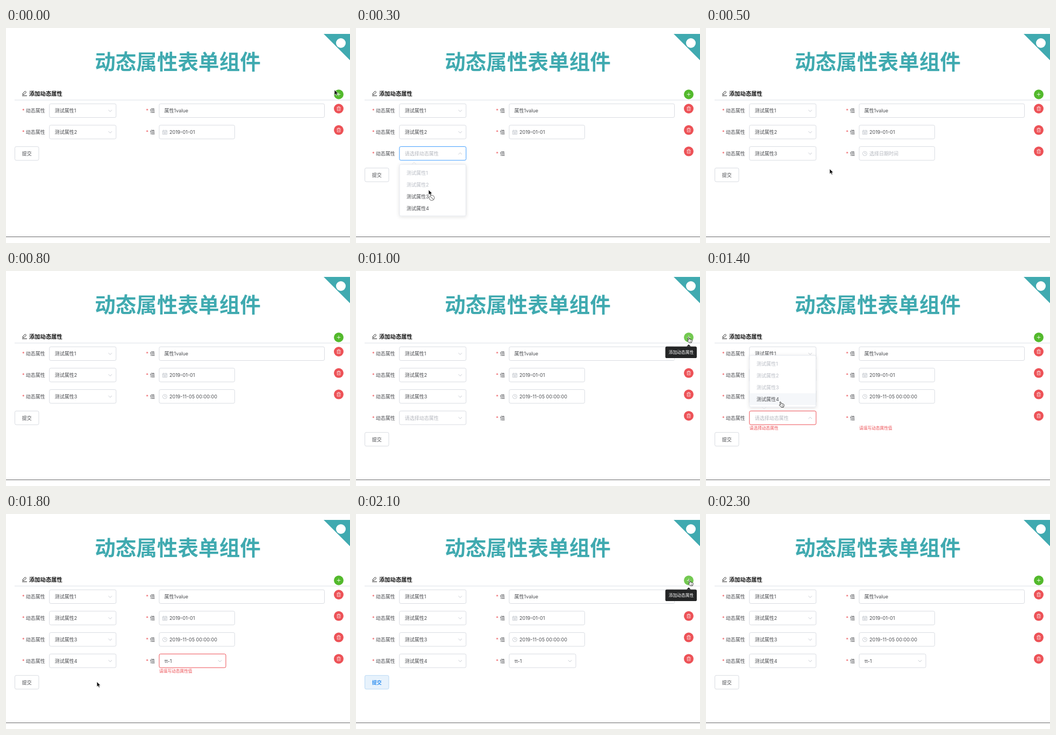
Write an HTML page that moves like this. It is 640 by 400 pixels and loops after 2400 ms.

```html
<!DOCTYPE html>
<html lang="zh-CN">
<head>
<meta charset="utf-8">
<style>
html, body { margin: 0; width: 100%; height: 100%; overflow: hidden; background: #fff; }
svg { display: block; width: 640px; height: 400px; font-family: Inter, "Noto Sans CJK SC", "Noto Sans CJK", sans-serif; }
</style>
</head>
<body>
<svg id="stage" viewBox="0 0 640 400"></svg>
<script>
const LOOP = 2400, STEP = 100, PITCH = 39.8;
const INK = '#4c4e52', PALE = '#b4b7be', EDGE = '#d9dce2', BLUE = '#409eff', RED = '#ed5257', GREEN = '#53b92c', TEAL = '#40aab0';
const stage = document.getElementById('stage');

// Text is placed by its vertical centre.
const text = (x, y, s, fill = INK, size = 9, extra = '') =>
  `<text x="${x}" y="${y + size * .37}" font-size="${size}" fill="${fill}" ${extra}>${s}</text>`;
const line = (d, stroke, width = .8, extra = '') =>
  `<path d="${d}" fill="none" stroke="${stroke}" stroke-width="${width}" ${extra}/>`;
const box = (x, y, w, h, stroke = EDGE, fill = '#fff', extra = '') =>
  `<rect x="${x}" y="${y}" width="${w}" height="${h}" rx="2.6" fill="${fill}" stroke="${stroke}" ${extra}/>`;
const at = (x, y, s) => `<g transform="translate(${x} ${y})">${s}</g>`;

const caret = (x, y, angle = 0) =>
  line('M-3.2-1.6L0 1.6L3.2-1.6', '#c0c4cc', .9, `transform="translate(${x} ${y}) rotate(${angle})"`);

function select(x, y, value, hint, edge, angle) {
  return box(x, y, 124, 25.5, edge) +
    text(x + 10, y + 13, value || hint, value ? INK : PALE) + caret(x + 113, y + 13, angle);
}

const calendar = line('M-4-3H4V4H-4ZM-4-1H4M-2-4.3V-2.4M2-4.3V-2.4M-2.5 .8H2.5M-2.5 2.4H2.5', '#bcc0c8');
const clock = '<circle r="4" fill="none" stroke="#bcc0c8" stroke-width=".8"/>' + line('M0-2.5V.3H2.2', '#bcc0c8');

function dateField(y, icon, value, hint, edge) {
  return box(285, y, 140.5, 25.5, edge) + at(295.5, y + 13, icon) +
    text(304, y + 13, value || hint, value ? INK : PALE);
}

const trash = (y) => at(619, y + 9,
  `<circle r="9" fill="${RED}"/>` +
  line('M-3.5-2.2H3.5M-1.4-2.2V-3.7H1.4V-2.2M-2.7-2.2V3.5H2.7V-2.2M-.9-.3V1.8M.9-.3V1.8', '#fff', .7));

function menu(y, taken, hover, above) {
  const tip = above ? line('M104 ' + (y + 96) + 'l4 4l4-4', EDGE) : line(`M104 ${y}l4-4l4 4`, EDGE);
  let s = box(81, y, 123.5, 96, '#e4e7ed', '#fff', 'filter="url(#shade)"') + tip;
  for (let k = 1; k <= 4; k++) {
    const cy = y + 15.5 + (k - 1) * 22;
    if (k === hover) s += `<rect x="81.5" y="${cy - 11}" width="122.5" height="22" fill="#f5f7fa"/>`;
    s += text(94, cy, '测试属性' + k, k <= taken ? '#b9bdc5' : INK);
  }
  return s;
}

const arrow = '<path d="M0 0V9.6L2.2 7.6L3.8 11L5.5 10.2L4 7H7Z" fill="#111" stroke="#fff" stroke-width=".7"/>';
const pointers = {
  arrow,
  blocked: arrow + '<circle cx="6" cy="15" r="4.8" fill="#fff" stroke="#888" stroke-width="1.2"/>' + line('M2.8 11.8L9.2 18.2', '#888', 1.2),
  hand: '<path d="M-.6 1Q.3-.6 1.3 1L2.4 4L6 4.4Q7.4 5 7.2 7.5L6.2 10.5H2L-1.6 6.6Q-1.6 5.2 .6 6Z" fill="#fff" stroke="#222" stroke-width=".9"/>' +
    line('M3.2 6.5V8.8M4.8 6.5V8.8', '#222', .6)
};

// Pointer stops: step, x, y, shape; it glides between neighbouring stops.
const stops = [
  [0, 611, 115, 'arrow'], [1, 618, 123, 'hand'], [2, 250, 225, 'arrow'], [3, 135, 301, 'blocked'],
  [4, 136, 313, 'hand'], [5, 230, 262, 'arrow'], [6, 340, 233, 'arrow'], [8, 0, 0, ''],
  [9, 613, 119, 'arrow'], [10, 618, 123, 'hand'], [11, 240, 250, 'arrow'], [12, 43, 313, 'hand'],
  [13, 140, 272, 'hand'], [14, 138, 243, 'hand'], [15, 230, 268, 'arrow'], [16, 345, 272, 'hand'],
  [18, 169, 312, 'arrow'], [19, 43, 313, 'hand'], [20, 350, 215, 'arrow'], [21, 620, 123, 'hand'],
  [22, 622, 128, 'arrow'], [23, 0, 0, '']
];

function pointer(i) {
  const k = stops.findLastIndex(s => s[0] <= i), a = stops[k], b = stops[k + 1];
  if (!a[3]) return '';
  const u = b && b[3] ? (i - a[0]) / (b[0] - a[0]) : 0;
  return at(a[1] + (u && (b[1] - a[1]) * u), a[2] + (u && (b[2] - a[2]) * u), pointers[a[3]]);
}

const page = `<defs><filter id="shade" x="-20%" y="-20%" width="140%" height="140%">
  <feDropShadow dx="0" dy="1.3" stdDeviation="3" flood-opacity=".12"/></filter></defs>
  <rect width="640" height="400" fill="#fff"/>
  <path d="M591 11H640V60Z" fill="${TEAL}"/><circle cx="623" cy="28" r="9" fill="#fff"/>` +
  text(319.5, 63, '动态属性表单组件', TEAL, 38.6, 'text-anchor="middle" font-weight="700"') +
  line('M31 124L31.5 121.5L35.6 117.4L37.7 119.5L33.6 123.6ZM30 126H39', '#222', 1) +
  text(43, 122, '添加动态属性', '#111', 10.3, 'font-weight="700"') +
  line('M16 134H640', '#dcdfe6', 1) + line('M0 388.5H640', '#68696b', 1);

function row(k, i) {
  const y = 141 + PITCH * k, mid = y + 13;
  const open = k === 2 ? i === 3 || i === 4 : k === 3 && (i === 13 || i === 14);
  const chosen = k < 2 || i >= (k === 2 ? 5 : 15);
  const checked = k === 3 && i >= 12;
  const badKey = checked && !chosen, badValue = checked && i <= 18;
  const angle = open ? 180 : badKey && i === 12 ? -45 : 0;
  let s = text(30, mid, '*', RED) + text(36.7, mid, '动态属性') +
    select(80.8, y, chosen && '测试属性' + (k + 1), '请选择动态属性', badKey ? RED : open ? BLUE : EDGE, angle) +
    text(260.5, mid, '*', RED) + text(268, mid, '值') + trash(y);
  if (k === 0) s += box(285, y, 307.5, 25.5) + text(294.5, mid, '属性1value');
  if (k === 1) s += dateField(y, calendar, '2019-01-01');
  if (k === 2 && chosen) s += dateField(y, clock, i >= 7 && '2019-11-05 00:00:00', '选择日期时间', i === 6 ? BLUE : EDGE);
  if (k === 3 && chosen) s += select(285, y, i >= 17 && 'tt-1', '请选择', badValue ? RED : EDGE, i === 16 ? 180 : 0);
  if (badKey) s += text(80.8, y + 31.5, '请选择动态属性', RED, 7.7);
  if (badValue) s += text(285, y + 31.5, '请填写动态属性值', RED, 7.7);
  return s;
}

function draw(i) {
  const rows = i < 1 ? 2 : i < 10 ? 3 : 4;
  const onAdd = [1, 10, 21].includes(i);
  const active = i === 12 || i >= 19 && i <= 21;
  const y = 220.7 + PITCH * (rows - 2);
  let s = page + at(619, 123.5, `<circle r="9" fill="${onAdd ? '#73c951' : GREEN}"/>` + line('M-3.3 0H3.3M0-3.3V3.3', '#fff'));
  for (let k = 0; k < rows; k++) s += row(k, i);
  s += box(16.5, y, 44.5, 25.5, active ? '#b9d9f5' : EDGE, active ? '#e7f2fc' : '#fff') +
    text(38.8, y + 13, '提交', active ? '#2f8ff0' : INK, 9, `text-anchor="middle" font-weight="${active ? 700 : 500}"`);
  if (i === 3 || i === 4) s += menu(253.7, 2, i === 4 ? 3 : 0);
  if (i === 14) s += menu(157, 3, 4, true);
  if (onAdd) s += '<path d="M615 140.5L619 136.5L623 140.5Z" fill="#242526"/>' +
    box(575.5, 140.5, 58.5, 21.5, 'none', '#242526') + text(581.8, 151.3, '添加动态属性', '#fff', 7.75);
  stage.innerHTML = s + pointer(i);
}

let shown = -1;
const start = performance.now();
function tick() {
  const i = Math.floor((performance.now() - start) % LOOP / STEP);
  if (i !== shown) draw(shown = i);
  requestAnimationFrame(tick);
}
tick();
</script>
</body>
</html>
```
